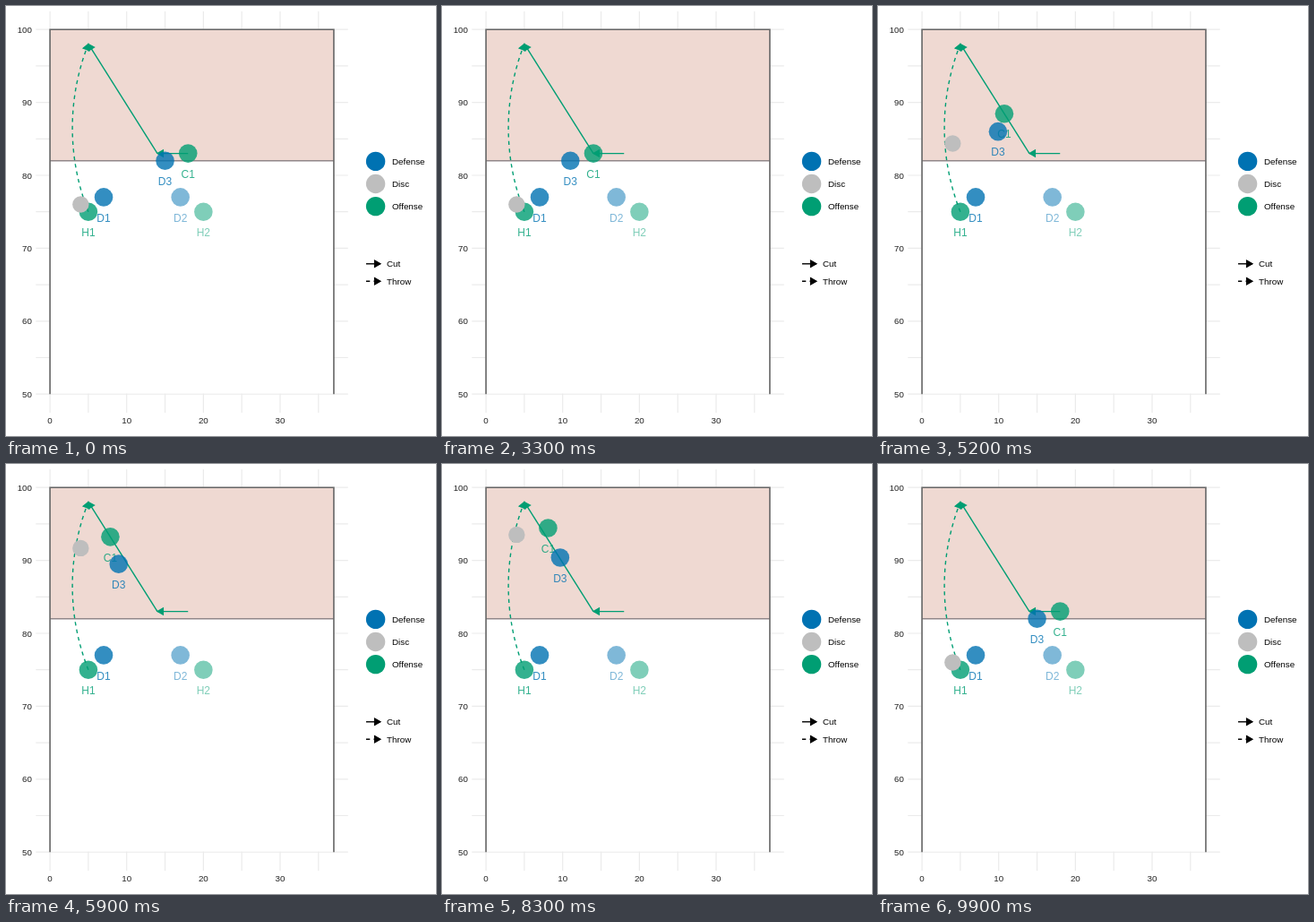
These frames come from a looping animation (480 px wide and 480 px high, 10 s). An HTML page:

```html
<!DOCTYPE html>
<html lang="en">
<head>
<meta charset="utf-8">
<title>Cut and throw play</title>
<style>
  html, body { margin: 0; width: 100%; height: 100%; overflow: hidden; background: #fff; }
  svg { display: block; width: 480px; height: 480px; }
  text { font: 9.8px "Liberation Sans", Arial, sans-serif; }
  .name { font-size: 12px; text-anchor: middle; }
</style>
</head>
<body>
<svg id="stage" viewBox="0 0 480 480"></svg>
<script>
const stage = document.getElementById('stage');
const BLUE = '#0072B2', GREEN = '#009E73', GREY = '#BEBEBE';
const X = x => 49.1 + x * 8.563;
const Y = y => 433.2 - (y - 50) * 8.14;

function add(tag, attrs, text) {
  const el = document.createElementNS('http://www.w3.org/2000/svg', tag);
  for (const key in attrs) el.setAttribute(key, attrs[key]);
  if (text) el.textContent = text;
  return stage.appendChild(el);
}
const line = (d, stroke, width, more) =>
  add('path', { d, stroke, 'stroke-width': width, fill: 'none', ...more });
const label = (x, y, text, more) => add('text', { x, y, ...more }, text);
const disc = (cx, cy, r, fill, opacity = 1) => add('circle', { cx, cy, r, fill, opacity });

// Path ending in a closed arrowhead at (x, y), pointing along angle
function arrow(d, x, y, angle, color, dashed) {
  line(d, color, 1.4, dashed ? { 'stroke-dasharray': '4.27 4.27' } : {});
  const corner = turn =>
    `${x - 7.5 * Math.cos(angle + turn)} ${y - 7.5 * Math.sin(angle + turn)}`;
  line(`M${corner(0.5236)}L${x} ${y}L${corner(-0.5236)}Z`, color, 1.2, { fill: color });
}

// Grid and axes
for (let i = 0; i <= 7; i++)
  line(`M${X(i * 5)} 6V454`, '#EBEBEB', 1.2);
for (let i = 0; i <= 10; i++)
  line(`M33.3 ${Y(50 + i * 5)}H381.8`, '#EBEBEB', 1.2);
for (let v = 0; v <= 30; v += 10)
  label(X(v), 466.3, String(v), { 'text-anchor': 'middle', fill: '#222' });
for (let v = 50; v <= 100; v += 10)
  label(29, Y(v) + 3.6, String(v), { 'text-anchor': 'end', fill: '#222' });

// Field and end zone
const left = X(0), right = X(37), far = Y(100), goal = Y(82), bottom = Y(50);
add('rect', { x: left, y: far, width: right - left, height: bottom - far - 0.7, fill: '#fff' });
add('rect', { x: left, y: far, width: right - left, height: goal - far, fill: '#EFD9D2' });
line(`M${left} ${goal}H${right}`, '#918789', 1.5);
line(`M${left} ${bottom}V${far}H${right}V${bottom}`, '#666', 1.6);

// Planned cuts and throw
const turnX = X(14), turnY = Y(83), endX = X(5), endY = Y(98);
arrow(`M${X(18)} ${turnY}H${turnX}`, turnX, turnY, Math.PI, GREEN);
arrow(`M${turnX} ${turnY}L${endX} ${endY}`, endX, endY,
  Math.atan2(endY - turnY, endX - turnX), GREEN);
arrow(`M${endX} ${Y(75)}A255 255 0 0 1 ${endX} ${endY}`, endX, endY, -1.19, GREEN, true);

// Positions per state; a single position means the player stands still
const players = [
  { name: 'H1', color: GREEN, alpha: 0.8, at: [[5, 75]] },
  { name: 'H2', color: GREEN, alpha: 0.5, at: [[20, 75]] },
  { name: 'C1', color: GREEN, alpha: 0.8, at: [[18, 83], [14, 83], [5, 98]] },
  { name: 'D1', color: BLUE, alpha: 0.8, at: [[7, 77]] },
  { name: 'D2', color: BLUE, alpha: 0.5, at: [[17, 77]] },
  { name: 'D3', color: BLUE, alpha: 0.8, at: [[15, 82], [11, 82], [8, 93]] },
  { color: GREY, alpha: 1, at: [[4, 76], [4, 76], [4, 99]] },
];
for (const p of players)
  if (p.name) p.text = label(0, 0, p.name, { class: 'name', fill: p.color, opacity: p.alpha });
for (const p of players)
  p.dot = disc(0, 0, p.name ? 10.3 : 9.2, p.color, p.alpha);

// Legend
[['Defense', BLUE], ['Disc', GREY], ['Offense', GREEN]].forEach(([text, color], i) => {
  disc(412.6, 173.4 + i * 25.1, 10.7, color);
  label(431, 176.9 + i * 25.1, text);
});
['Cut', 'Throw'].forEach((text, i) => {
  const y = 287.8 + i * 19.5;
  arrow(`M402 ${y}H418`, 418, y, 0, '#000', i === 1);
  label(425, y + 3.5, text);
});

// Ten steps per second; each move is linear
function progress(step) {
  if (step < 12) return [0, 0];
  if (step < 46) return [0, Math.min(1, (step - 11) / 22)];
  if (step < 79) return [1, Math.min(1, (step - 44) / 22)];
  return [2, (step - 78) / 21];
}

function draw() {
  const [state, p] = progress(Math.floor(performance.now() % 10000 / 100));
  for (const { at, dot, text } of players) {
    const from = at[state % at.length], to = at[(state + 1) % at.length];
    const x = X(from[0] + (to[0] - from[0]) * p);
    const y = Y(from[1] + (to[1] - from[1]) * p);
    dot.setAttribute('cx', x);
    dot.setAttribute('cy', y);
    if (text) {
      text.setAttribute('x', x);
      text.setAttribute('y', y + 27.2);
    }
  }
  requestAnimationFrame(draw);
}
draw();
</script>
</body>
</html>
```
